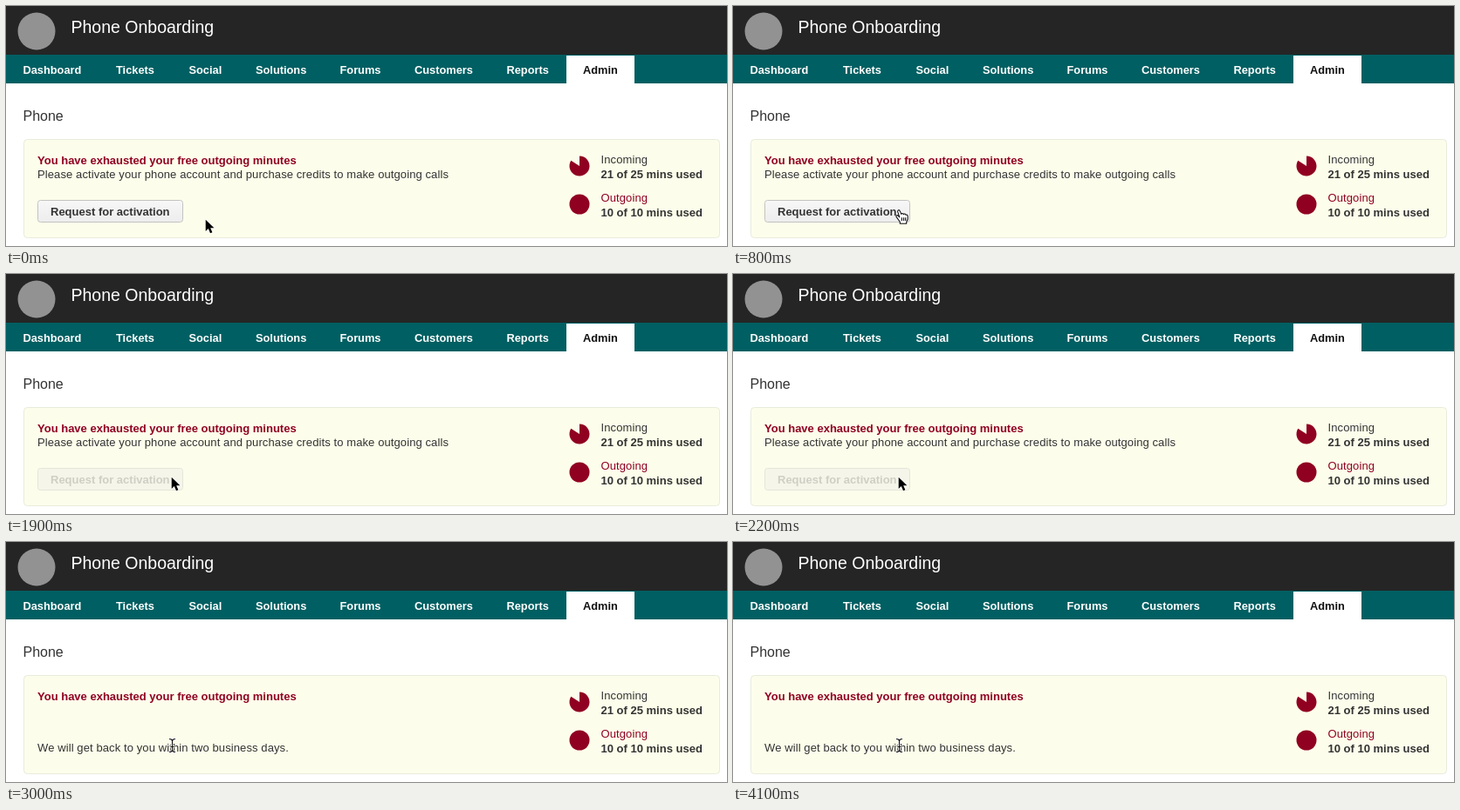
Write an HTML page that moves like this. It is 826 px wide and 276 px high and loops after 4200 ms.

```html
<!DOCTYPE html>
<html lang="en">
<head>
<meta charset="utf-8">
<title>Phone Onboarding</title>
<style>
  html, body { margin: 0; width: 100%; height: 100%; overflow: hidden; background: #fff; }
  svg { display: block; width: 826px; height: 276px; }
  text { font: 13px "Liberation Sans", Arial, sans-serif; fill: #333; letter-spacing: .1px; }
  .bold { font-weight: bold; letter-spacing: 0; }
  .red { fill: #900021; }
  .title { font-size: 19.5px; fill: #fff; letter-spacing: 0; }
  .heading { font-size: 16px; letter-spacing: 0; }
  .nav text { font-size: 12.8px; font-weight: bold; fill: #fff; letter-spacing: 0; }
  .nav .active { fill: #111; }

  /* Every state is a hard cut within one 4.2 s loop. */
  .step { animation: 4.2s step-end infinite; }
  .arrow { animation-name: arrow; }
  .hand { animation-name: hand; opacity: 0; }
  .beam, .reply { animation-name: after-reply; opacity: 0; }
  .request { animation-name: before-reply; }
  .enabled { animation-name: enabled; }
  .pressed { animation-name: pressed; opacity: 0; }
  .disabled { animation-name: disabled; opacity: 0; }

  @keyframes arrow {
    0% { transform: translate(228px, 245px); opacity: 1; }
    14.28% { transform: translate(223px, 242px); opacity: 1; }
    16.66% { transform: translate(208px, 237px); opacity: 1; }
    19.04% { transform: translate(189px, 233px); opacity: 0; }
    30.94% { transform: translate(189px, 233px); opacity: 1; }
    54.75%, 100% { transform: translate(189px, 233px); opacity: 0; }
  }
  @keyframes hand { 0% { opacity: 0; } 19.04% { opacity: 1; } 30.94%, 100% { opacity: 0; } }
  @keyframes enabled { 0% { opacity: 1; } 26.18%, 100% { opacity: 0; } }
  @keyframes pressed { 0% { opacity: 0; } 26.18% { opacity: 1; } 30.94%, 100% { opacity: 0; } }
  @keyframes disabled { 0% { opacity: 0; } 30.94% { opacity: 1; } 54.75%, 100% { opacity: 0; } }
  @keyframes before-reply { 0% { opacity: 1; } 54.75%, 100% { opacity: 0; } }
  @keyframes after-reply { 0% { opacity: 0; } 54.75%, 100% { opacity: 1; } }
</style>
</head>
<body>
<svg viewBox="0 0 826 276">
  <defs>
    <linearGradient id="raised" x2="0" y2="1">
      <stop stop-color="#f7f7f7"/><stop offset="1" stop-color="#ededed"/>
    </linearGradient>
    <linearGradient id="sunken" x2="0" y2="1">
      <stop stop-color="#cfcfcf"/><stop offset=".2" stop-color="#e2e2e2"/><stop offset="1" stop-color="#e6e6e6"/>
    </linearGradient>
  </defs>

  <rect width="826" height="56" fill="#252525"/>
  <circle cx="35" cy="29" r="21.5" fill="#929292"/>
  <text class="title" x="74.5" y="31">Phone Onboarding</text>

  <g class="nav">
    <rect y="56" width="826" height="33" fill="#005f62"/>
    <rect x="642" y="57" width="78" height="32" fill="#fff"/>
    <text x="19.5" y="78">Dashboard</text>
    <text x="126" y="78">Tickets</text>
    <text x="209.5" y="78">Social</text>
    <text x="286" y="78">Solutions</text>
    <text x="382.5" y="78">Forums</text>
    <text x="468" y="78">Customers</text>
    <text x="573.5" y="78">Reports</text>
    <text class="active" x="661" y="78">Admin</text>
  </g>

  <text class="heading" x="19.5" y="132">Phone</text>
  <rect x="20.5" y="153.5" width="797" height="113" rx="4" fill="#fdfdeb" stroke="#e7ecdb"/>
  <text class="bold red" x="36" y="182">You have exhausted your free outgoing minutes</text>

  <g class="step request">
    <text x="36" y="198">Please activate your phone account and purchase credits to make outgoing calls</text>
  </g>
  <g class="step enabled">
    <rect x="36.5" y="223.5" width="166" height="25" rx="3" fill="url(#raised)" stroke="#c3c3c0"/>
    <text class="bold" x="51" y="241">Request for activation</text>
  </g>
  <g class="step pressed">
    <rect x="36.5" y="223.5" width="166" height="25" rx="3" fill="url(#sunken)" stroke="#b4b4b1"/>
    <text class="bold" x="51" y="241">Request for activation</text>
  </g>
  <g class="step disabled">
    <rect x="36.5" y="223.5" width="166" height="25" rx="3" fill="#f5f5e9" stroke="#e5e5da"/>
    <text class="bold" x="51" y="241" style="fill:#cfcfc5">Request for activation</text>
  </g>
  <text class="step reply" x="36" y="241">We will get back to you within two business days.</text>

  <path class="red" d="M657 184V172.5A11.5 11.5 0 1 1 647.3 177.8Z"/>
  <circle class="red" cx="657" cy="228" r="11.5"/>
  <text x="681.5" y="181">Incoming</text>
  <text class="bold" x="681.5" y="198">21 of 25 mins used</text>
  <text class="red" x="681.5" y="225">Outgoing</text>
  <text class="bold" x="681.5" y="242">10 of 10 mins used</text>

  <path class="step arrow" d="M.7 .7V14L3.8 11.1 6 16.2 8.4 15.2 6.2 10.2H10.4Z"
    stroke="#fff" stroke-width="1.2" paint-order="stroke"/>
  <path class="step hand" fill="#fff" stroke="#111" stroke-width="1.1" stroke-linejoin="round"
    d="M191.3 250.3V248.2L187.2 242.6C186.2 241 188 240 189.3 241.3L190.8 242.9 188.7 236.6C188.3 234.5 190.5 233.8 191.3 235.9L192.8 239.4C193.1 238.1 195 238.2 195.3 239.6 196 238.5 197.6 238.9 197.9 240.2 198.9 239.6 200.2 240.4 200.2 242V245.3L198.7 248.4V250.3ZM193.4 243.2V247M195.6 243.2V247M197.7 243.2V247"/>
  <g class="step beam" fill="none">
    <path id="ibeam" d="M187 226.5Q190 226.5 190.5 228.5 191 226.5 194 226.5M190.5 228V240M187 241.5Q190 241.5 190.5 239.5 191 241.5 194 241.5M188.5 235.5H192.5"
      stroke="#fff" stroke-width="2.6"/>
    <use href="#ibeam"/>
    <path d="M187 226.5Q190 226.5 190.5 228.5 191 226.5 194 226.5M190.5 228V240M187 241.5Q190 241.5 190.5 239.5 191 241.5 194 241.5M188.5 235.5H192.5"
      stroke="#111" stroke-width="1.1"/>
  </g>
</svg>
</body>
</html>
```
